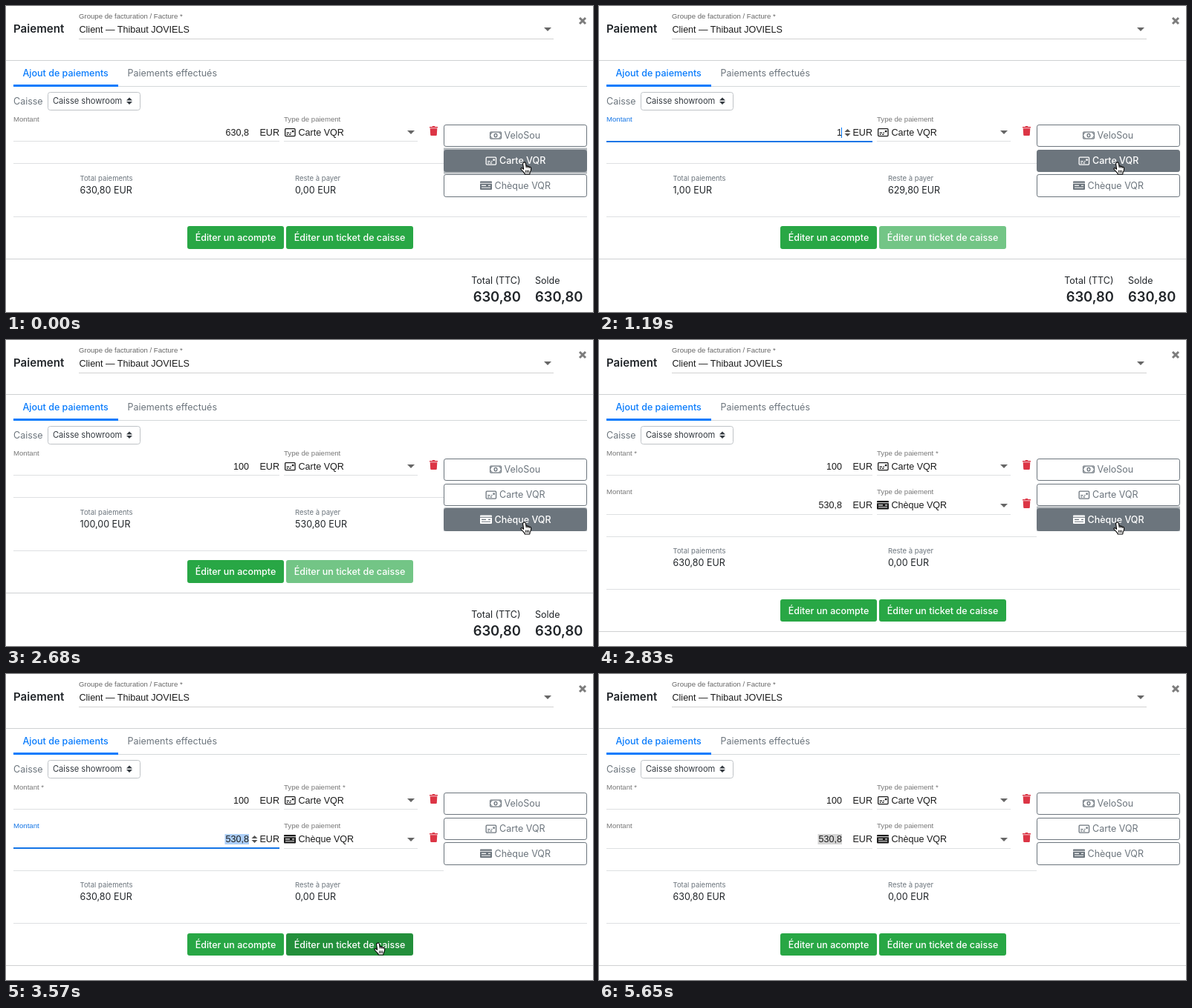
Recreate the animation shown at these times as an HTML page. Size 790x413 px, loop 5750 ms.

```html
<!DOCTYPE html>
<html lang="fr">
<head>
<meta charset="utf-8">
<title>Paiement</title>
<style>
  html, body { margin: 0; width: 100%; height: 100%; overflow: hidden; background: #fff; }
  svg { display: block; width: 790px; height: 413px; }
  text { font: 12.5px Inter, sans-serif; white-space: pre; }
  .field { font: 12.55px "Liberation Sans", Arial, sans-serif; }
  .label { font: 9.6px "Liberation Sans", Arial, sans-serif; }
  .small { font-size: 9.5px; }
  .strong { font-weight: 500; }
  .title { font-size: 15.1px; font-weight: 600; }
  .select { font-size: 11.1px; }
  .total { font-size: 18.4px; font-weight: 600; }
</style>
</head>
<body>
<svg id="stage" viewBox="0 0 790 413"></svg>
<script>
const LOOP = 5750;
const ROW = 52.4;  // height of a payment row; edges snap to whole pixels
const INK = '#212529', GREY = '#6c757d', BLUE = '#1475e6', TAB = '#087bfc', GREEN = '#28a745';
const SELECTED = '#accef7';

// focus: [line width, line opacity] or null; sel: selection colour
const initial = {
  rows: 1, amount: '630,8', total: '630,80', rest: '0,00', ticket: 'on',
  focus: null, sel: null, caret: false,
  card: 1, cheque: 0, cardRing: 2.6, chequeRing: 0,
  pointer: 'hand', x: 692, y: 210
};

// Each step changes only the listed properties.
const steps = [
  [0, {}],
  [150, { focus: [.6, .25], sel: SELECTED, cardRing: 1.8 }],
  [300, { focus: [.985, .9], cardRing: 0 }],
  [450, { focus: [1, 1] }],
  [1190, { amount: '1', total: '1,00', rest: '629,80', ticket: 'off', sel: null, caret: true }],
  [1340, { amount: '10', total: '10,00', rest: '620,80' }],
  [1490, { amount: '100', total: '100,00', rest: '530,80' }],
  [1940, { caret: false }],
  [2080, { x: 720, y: 212 }],
  [2230, { x: 722, y: 223 }],
  [2380, { x: 707, y: 232, card: .4 }],
  [2530, { x: 692, y: 245, card: 0, cheque: .8, caret: true }],
  [2680, { cheque: 1, chequeRing: .9, caret: false, focus: null }],
  [2830, { rows: 2, total: '630,80', rest: '0,00', ticket: 'on', chequeRing: 2.6 }],
  [2980, { focus: [.8, .5], sel: SELECTED, chequeRing: 0 }],
  [3130, { focus: [1, 1], x: 680, y: 249 }],
  [3270, { pointer: 'arrow', x: 582, y: 291, cheque: .5 }],
  [3420, { pointer: 'hand', x: 505, y: 356, cheque: 0 }],
  [3570, { x: 495, y: 362, ticket: 'hover' }],
  [3720, { x: 492, y: 364 }],
  [4610, { x: 515, y: 367 }],
  [4760, { pointer: 'arrow', x: 640, y: 408, ticket: 'on' }],
  [4910, { x: 694, y: 412 }],
  [5060, { pointer: null }],
  [5650, { focus: null, sel: '#d4d4d4' }]
];
let last = initial;
const states = steps.map(([time, change]) => {
  last = { ...last, ...change };
  return { time, state: last };
});

const snap = Math.round;
const text = (x, y, str, cls = '', fill = INK, anchor = 'start') =>
  `<text x="${x}" y="${snap(y)}" class="${cls}" fill="${fill}" text-anchor="${anchor}">${str}</text>`;
const rect = (x, y, w, h, fill, extra = '') =>
  `<rect x="${x}" y="${y}" width="${w}" height="${h}" fill="${fill}" ${extra}/>`;
const line = (x1, x2, y, color = '#dee0e2') => rect(x1, snap(y), x2 - x1, 1, color);
const path = (d, fill, extra = '') => `<path d="${d}" fill="${fill}" ${extra}/>`;
const at = (x, y, body) => `<g transform="translate(${x} ${y})">${body}</g>`;
const dropArrow = (x, y) => path(`M${x} ${snap(y)}h10l-5 5z`, '#666');
const updown = (x, y, w, h, gap, color) =>
  path(`M${x} ${y + h}h${w}l${-w / 2} ${-h}zM${x} ${y + h + gap}h${w}l${-w / 2} ${h}z`, color);

const icons = {
  note: c => `<g fill="none" stroke="${c}" stroke-width="1.3">
    <rect x=".65" y=".65" width="14.7" height="8.9" rx="1"/>
    <ellipse cx="8" cy="5.1" rx="1.9" ry="2.3"/>
    <path d="M1 3.2Q3 3 3.2 1M1 7Q3 7.2 3.2 9.2M15 3.2Q13 3 12.8 1M15 7Q13 7.2 12.8 9.2" stroke-width="1"/></g>`,
  card: c => `<g fill="none" stroke="${c}" stroke-width="1.3">
    <rect x=".65" y=".65" width="13.4" height="9.9" rx="1"/>
    <path d="M2.7 6.2h3.4M7.4 6.2h1.6M2.7 8.3h2M6 8.3h2.6M9.8 3.6h2.6M9.8 4.7h2.6"/></g>`,
  cheque: c => path('M1 0H15Q16 0 16 1V2.3H0V1Q0 0 1 0ZM0 3.3H16V10.5Q16 11.5 15 11.5H1Q0 11.5 0 10.5Z' +
    'M2 5.2V6.4H8V5.2ZM11 5.2V6.4H14V5.2ZM2 8.2V9.3H14V8.2Z', c, 'fill-rule="evenodd"'),
  bin: c => path('M0 1H3.4L4 0H7L7.6 1H11V2.5H0ZM.7 3.3H10.3L9.8 12Q9.7 13 8.7 13H2.3Q1.3 13 1.2 12Z', c)
};

const pointers = {
  hand: path('M4.8 1.2Q6.9 .2 7.4 2.5L8 6.2Q9.2 5.3 10.1 6.6Q11.5 5.9 12.3 7.3Q14.3 6.8 14.6 9Q15 12 13.2 14.4L12.8 17H6.2L5.8 15.5' +
    'Q3.6 13.2 1.2 10.5Q.6 8.6 2.3 8.6L4.6 10.2L3.6 3.2Q3.4 1.8 4.8 1.2Z', '#fff', 'stroke="#000" stroke-width="1.1" stroke-linejoin="round"') +
    path('M8 6.2L8.3 8.6M10.1 6.6L10.4 8.8M12.3 7.3L12.4 9M7.6 11.5V15M9.5 11.5V15M11.4 11.5V15', 'none', 'stroke="#000" stroke-width=".9"'),
  arrow: path('M.6 .8V14.3L3.7 11.4L5.8 16.3L8 15.4L5.9 10.6H10.2Z', '#000', 'stroke="#fff" stroke-width="1"')
};

function header() {
  return text(10, 36, 'Paiement', 'title') +
    text(98, 17, 'Groupe de facturation / Facture *', 'label', '#666') +
    text(98.5, 36, 'Client — Thibaut JOVIELS', 'field', '#1c1c1c') +
    dropArrow(724, 29) + line(98, 737, 44, '#d2d2d2') +
    path('M772 16l8 8M780 16l-8 8', 'none', 'stroke="#7c7c7c" stroke-width="3"') +
    line(0, 790, 73, '#cfd1d3') +
    text(22.5, 95, 'Ajout de paiements', 'strong', TAB) +
    text(163.5, 95, 'Paiements effectués', '', GREY) +
    line(10, 782, 108, '#d5d8da') + rect(10, 106, 141, 3, TAB) +
    text(10, 133, 'Caisse', '', GREY) +
    rect(56.5, 116.5, 124, 24, '#fff', 'rx="3" stroke="#bfc3c7"') +
    text(63, 132, 'Caisse showroom', 'select', '#343a40') +
    updown(162, 123.5, 8, 4, 1.5, '#343a40');
}

function row(y, amount, kind, star, s, current) {
  const focus = current ? s.focus : null;
  const sel = current ? s.sel : null;
  const top = snap(y);
  let out = text(10, y + 156, 'Montant' + star, 'label', focus ? BLUE : '#777') +
    text(374, y + 156, 'Type de paiement' + star, 'label', '#777') +
    line(10, 368, y + 182.3) + line(374, 554, y + 182.3);
  if (sel) out += rect(294.5, top + 164, 32.5, 14, sel);
  out += text(327, y + 175, amount, 'field', '#1c1c1c', 'end') +
    text(341.5, y + 175, 'EUR', 'field', '#1c1c1c');
  if (focus) {
    const [width, opacity] = focus;
    out += rect(189 - 179 * width, top + 182, 358 * width, 2, BLUE, `opacity="${opacity}"`) +
      updown(330.5, top + 166, 8, 4, 2, '#555');
    if (s.caret) out += rect(326, top + 164, 1, 14, TAB);
  }
  const cheque = kind === 'cheque';
  return out + at(cheque ? 374 : 375, top + 165, icons[kind]('#1c1c1c')) +
    text(393.5, y + 175, cheque ? 'Chèque VQR' : 'Carte VQR', 'field', '#1c1c1c') +
    dropArrow(540, y + 168.3) + at(570, top + 162, icons.bin('#dc3545'));
}

function sideButton(y, h, icon, ix, tx, label, fill, ring) {
  const active = fill >= .5;
  const color = active ? '#fff' : GREY;
  const halo = ring
    ? rect(589 - ring, y - ring, 193 + 2 * ring, h + 2 * ring, '#b5babe', 'rx="4"') : '';
  return halo + rect(589.5, y + .5, 192, h - 1, '#fff', 'rx="2.6"') +
    rect(589.5, y + .5, 192, h - 1, GREY, `rx="2.6" fill-opacity="${fill}" stroke="${GREY}"`) +
    at(ix, y + 9.5, icons[icon](color)) +
    text(tx, y + h / 2 + 4.4, label, active ? 'strong' : '', color);
}

function greenButton(x, y, w, label, fill) {
  const top = snap(y);
  return rect(x, top, w, snap(y + 30.7) - top, fill, 'rx="3"') +
    text(x + w / 2, top + 20, label, 'strong', '#fff', 'middle');
}

function summary(y, s) {
  const ticketFill = { on: GREEN, off: '#73c586', hover: '#238f3b' }[s.ticket];
  return line(10, 589, y + 212.3) + line(10, 782, y + 284) +
    text(99.5, y + 236, 'Total paiements', 'small', GREY) +
    text(99.5, y + 253, s.total + ' EUR') +
    text(389, y + 236, 'Reste à payer', 'small', GREY) +
    text(389, y + 253, s.rest + ' EUR') +
    greenButton(244, y + 297.3, 130, 'Éditer un acompte', GREEN) +
    greenButton(377, y + 297.3, 171, 'Éditer un ticket de caisse', ticketFill) +
    line(0, 790, y + 341, '#cfd1d3') +
    text(692.5, y + 375, 'Total (TTC)', '', INK, 'end') + text(712, y + 375, 'Solde') +
    text(693, y + 399, '630,80', 'total', INK, 'end') + text(712, y + 399, '630,80', 'total');
}

function draw(s) {
  const two = s.rows === 2;
  return '<clipPath id="side"><rect x="589" y="155" width="193" height="103"/></clipPath>' +
    rect(0, 0, 790, 413, '#fff') + header() +
    row(0, s.amount, 'card', two ? ' *' : '', s, !two) +
    (two ? row(ROW, '530,8', 'cheque', '', s, true) : '') +
    summary(two ? ROW : 0, s) +
    '<g clip-path="url(#side)">' +
    sideButton(160, 30, 'note', 651, 670.5, 'VeloSou', 0, 0) +
    sideButton(194, 30, 'card', 645.5, 664, 'Carte VQR', s.card, s.cardRing) +
    sideButton(227, 31, 'cheque', 638, 657.5, 'Chèque VQR', s.cheque, s.chequeRing) +
    '</g>' +
    (s.pointer ? at(s.x, s.y, pointers[s.pointer]) : '');
}

const stage = document.getElementById('stage');
const start = performance.now();
let shown = null;

function tick() {
  const t = (performance.now() - start) % LOOP;
  const { state } = states.findLast(step => step.time <= t);
  if (state !== shown) {
    stage.innerHTML = draw(state);
    shown = state;
  }
  requestAnimationFrame(tick);
}
tick();
</script>
</body>
</html>
```
